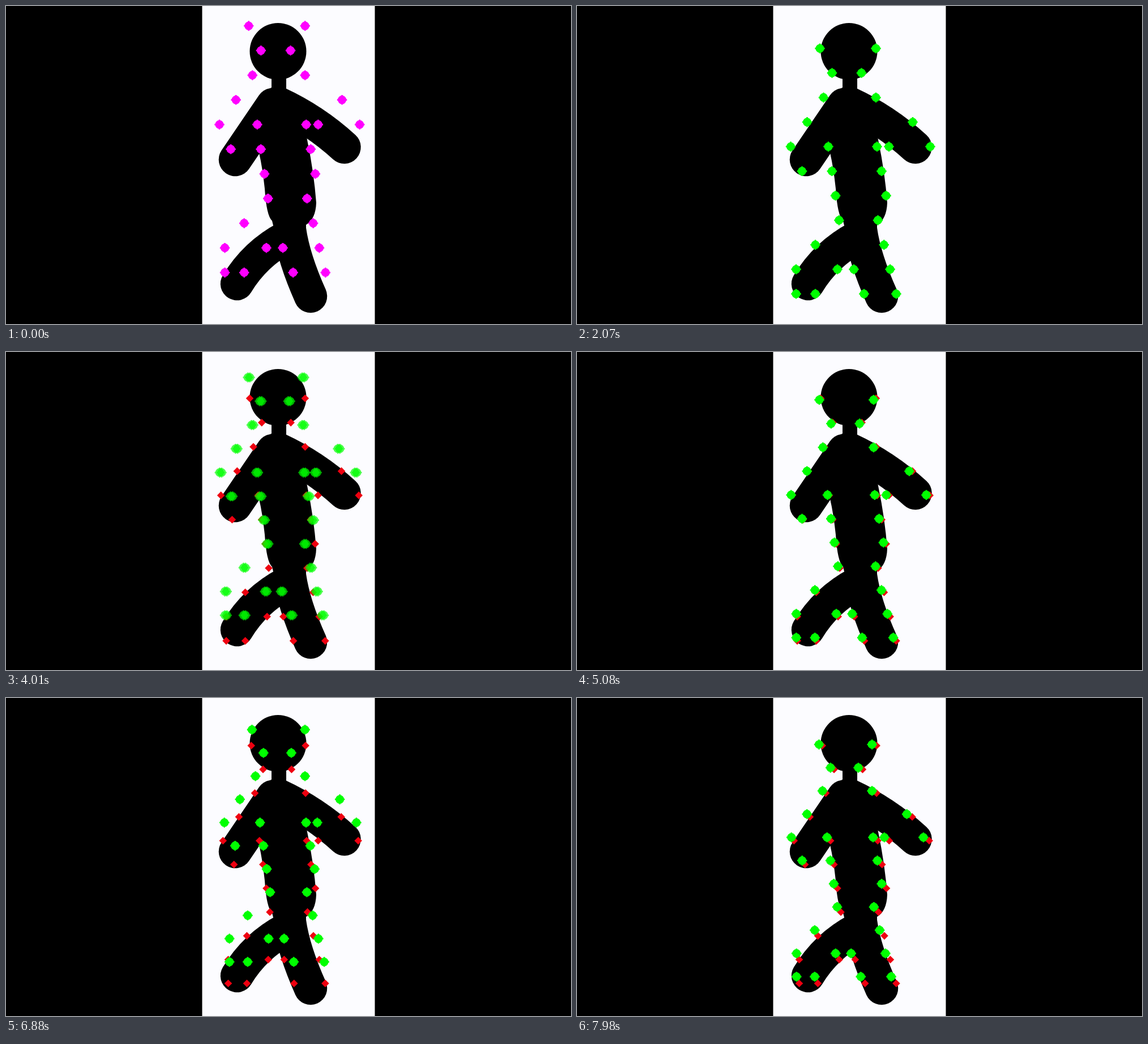
An HTML page with a canvas for the animation above (8 s loop, 998 by 561 pixels).

```html
<!DOCTYPE html>
<html lang="en">
<head>
<meta charset="utf-8">
<title>Point model search</title>
<style>
  html, body { margin: 0; width: 100%; height: 100%; overflow: hidden; background: #000; }
  canvas { display: block; width: 998px; height: 561px; }
</style>
</head>
<body>
<canvas id="stage" width="998" height="561"></canvas>
<script>
const ctx = document.getElementById('stage').getContext('2d');
const LOOP = 8000, STEPS = 240, GREEN_START = 45;
const ROW_HEIGHT = 43.3, CENTER = 478.5;

// The model samples straight body edges on evenly spaced rows.
const edge = (row, count, x, slope = 0) => Array.from({ length: count },
  (_, i) => [x + slope * i - CENTER, (row + i) * ROW_HEIGHT]);
const headRow = (row, halfWidth) => edge(row, 2, 0).map((_, i) =>
  [(i ? 1 : -1) * halfWidth - row * 2, row * ROW_HEIGHT]);

const points = [
  headRow(0, 49.5), headRow(1, 26),
  edge(2, 3, 435.5, -29), edge(5, 1, 397.5),               // left arm
  edge(2, 2, 528, 65), edge(4, 1, 551), edge(4, 1, 624),   // right arm
  edge(4, 4, 444, 6.3), edge(4, 3, 530, 8),                // torso
  edge(8, 2, 421, -34), edge(10, 1, 387), edge(9, 2, 460, -39), // left leg
  edge(7, 4, 531.5, 10.8), edge(9, 2, 489, 18)             // right leg
].flat();

// Key poses of the search: step, sweep count, centre x.
const searchPath = [
  [45, .62, 480], [62, 1.47, 478.5], [93, 2.48, 480], [120, 3.85, 477],
  [152, 5.35, 476], [206, 7.71, 481.3], [239, 9.38, 474.3]
];
const bestSteps = [62, 90, 175];

const limbs = new Path2D(`
  M471 174 L405 271
  M480 171 Q545 201 597.5 249
  M495 408 Q440 437 408 490
  M501 395 Q508 445 538 512`);
const torso = new Path2D(`
  M469 120 H495 V180 H520 L532 236 Q544 294 548 347 Q547 376 530 386
  V420 H480 L470 379 Q460 370 457 322 Q453 285 447 259 L460 180 H469 Z`);

function magentaPose(n) {
  const step = Math.min(n, 37);
  const sweep = .79 + step * .0543;
  return { x: CENTER + 4 * Math.sin(step / 8), y: 118 - 105 * (sweep % 1), scale: 1.005 };
}

function greenPose(n) {
  const i = Math.max(1, searchPath.findIndex(key => key[0] >= n));
  const [a, b] = [searchPath[i - 1], searchPath[i]];
  const f = (n - a[0]) / (b[0] - a[0]);
  const mix = k => a[k] + (b[k] - a[k]) * f;
  const sweep = mix(1);
  return {
    x: mix(2) + 4 * Math.sin(f * Math.PI * 10),
    y: 112 - 79 * (sweep % 1),
    scale: sweep < 2 ? 1 : sweep < 3 ? .988 : sweep < 7 ? .969 : .946
  };
}

function dot(x, y) {
  ctx.beginPath();
  ctx.arc(x, y, 7.6, 0, Math.PI * 2);
  ctx.rect(x - 8.7, y - 1.3, 17.4, 2.6);
  ctx.rect(x - 1.3, y - 8.7, 2.6, 17.4);
  ctx.fill();
}

function diamond(x, y, r = 6.8) {
  ctx.beginPath();
  ctx.moveTo(x - r, y);
  ctx.lineTo(x, y - r);
  ctx.lineTo(x + r, y);
  ctx.lineTo(x, y + r);
  ctx.fill();
}

function drawModel({ x, y, scale }, color, mark) {
  ctx.fillStyle = color;
  for (const [dx, dy] of points) mark(x + dx * scale, y + dy * scale);
}

function drawGreen(n) {
  const best = bestSteps.filter(step => step <= n).pop();
  if (best) drawModel(greenPose(best), '#ee0010', diamond);
  const pose = greenPose(n);
  // Some steps blend two neighbouring positions.
  if (n % 6 === 0) {
    ctx.globalAlpha = .7;
    for (const side of [-1.8, 1.8]) drawModel({ ...pose, x: pose.x + side }, '#0f0', dot);
    ctx.globalAlpha = 1;
  } else {
    drawModel(pose, '#0f0', dot);
  }
}

function drawFigure() {
  ctx.fillStyle = ctx.strokeStyle = '#000';
  ctx.lineWidth = 58.5;
  ctx.lineCap = 'round';
  ctx.stroke(limbs);
  ctx.fill(torso);
  ctx.beginPath();
  ctx.arc(480.5, 80, 50, 0, Math.PI * 2);
  ctx.fill();
}

function render(time) {
  const n = Math.floor((time % LOOP) / LOOP * STEPS);
  ctx.fillStyle = '#000';
  ctx.fillRect(0, 0, 998, 561);
  ctx.save();
  ctx.beginPath();
  ctx.rect(346.5, 0, 305, 561);
  ctx.clip();
  ctx.fillStyle = '#fcfcff';
  ctx.fillRect(346, 0, 307, 561);
  drawFigure();
  if (n < GREEN_START) drawModel(magentaPose(n), '#f0f', dot);
  else drawGreen(n);
  ctx.restore();
}

const start = performance.now();
function tick() {
  render(performance.now() - start);
  requestAnimationFrame(tick);
}
tick();
</script>
</body>
</html>
```
